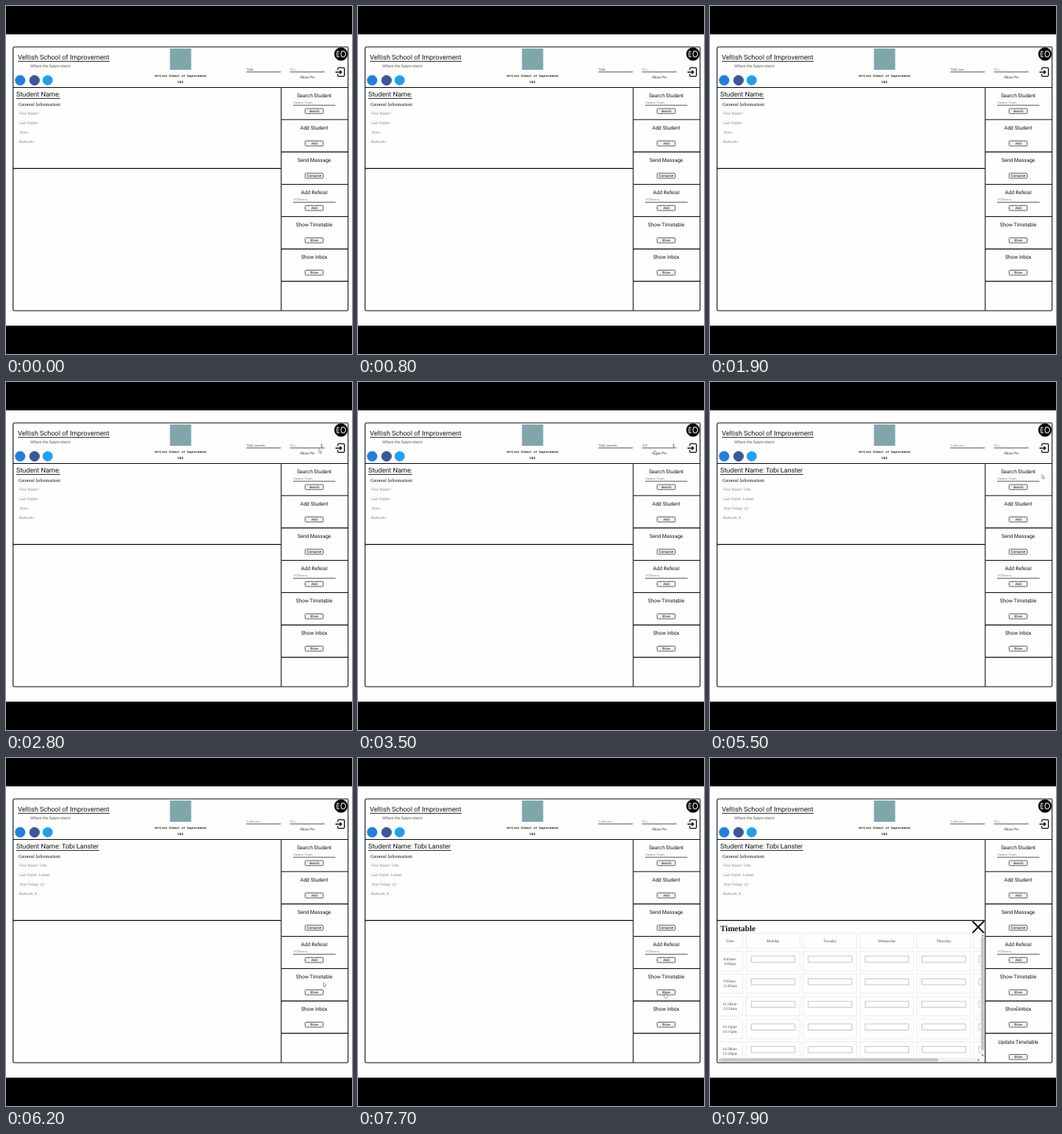
Recreate the animation shown at these times as an HTML page. Size 440x442 px, loop 8000 ms.

```html
<!DOCTYPE html>
<html lang="en">
<head>
<meta charset="utf-8">
<title>School portal</title>
<style>
html, body { margin: 0; width: 100%; height: 100%; overflow: hidden; background: #000; }
svg { display: block; width: 440px; height: 442px; }
text { font-family: Roboto, sans-serif; fill: #151515; text-rendering: geometricPrecision; white-space: pre; }
.serif { font-family: "Liberation Serif", serif; }
.mono { font-family: "Liberation Mono", monospace; font-weight: bold; }
.mid { text-anchor: middle; }
.hint { font: italic 4.4px "Liberation Serif", serif; fill: #858585; }
.typed { font: 4.6px "Liberation Serif", serif; fill: #444; }
.info { font: 5.1px "Liberation Serif", serif; fill: #777; }
.cellText { font: 5px "Liberation Serif", serif; fill: #444; text-anchor: middle; }
.line { fill: none; stroke: #151515; }
.thin { fill: none; stroke: #333; stroke-width: .8; }
.button { fill: #f1f1f1; stroke: #444; stroke-width: .8; }
.cell { fill: none; stroke: #e9e9e9; stroke-width: .8; }
.input { fill: #fff; stroke: #bbb; stroke-width: .8; }
</style>
</head>
<body>
<svg viewBox="0 0 440 442" xmlns="http://www.w3.org/2000/svg">
  <defs>
    <clipPath id="tableClip"><rect x="10" y="207" width="334" height="173.5"/></clipPath>
  </defs>
  <rect width="440" height="442"/>
  <rect y="36" width="440" height="370" fill="#fefefe"/>

  <!-- Header -->
  <text x="15" y="67.5" font-size="8.55">Veltish School of Improvement</text>
  <path class="line" stroke-width=".9" d="M15 70.3H132"/>
  <text x="31" y="78" font-size="5.15" font-style="italic" style="fill:#555">Where the future starts</text>
  <circle cx="18" cy="94.3" r="6.6" fill="#1f7fe0"/>
  <circle cx="36.3" cy="94.3" r="6.6" fill="#3b5998"/>
  <circle cx="53" cy="94.3" r="6.4" fill="#1da1f2"/>
  <rect x="208.5" y="54" width="27" height="27" fill="#7fa6aa"/>
  <text class="mono mid" x="222" y="90.3" font-size="3.8">Veltish School of Improvement</text>
  <text class="mono mid" x="222" y="98" font-size="4.2">VSI</text>

  <!-- Login fields -->
  <path class="thin" d="M305.5 83.8H349.5M361 83.8H405"/>
  <text class="typed" id="name" x="306" y="82"></text>
  <text class="hint" x="306" y="82" data-on="5300 8000">Fullname...</text>
  <text class="hint" x="361.5" y="82" data-on="0 2900 5300 8000">Pin...</text>
  <text class="typed" id="pin" x="361.5" y="82"></text>
  <path data-on="2800 3700" d="M400 80.2l1.4-1.8 1.4 1.8zM400 81.4l1.4 1.8 1.4-1.8z" fill="#555"/>
  <rect data-on="3600 5000" x="373.7" y="87" width="12" height="6.2" fill="#2d86e2"/>
  <text x="374" y="91.8" font-size="4.5" style="fill:#333">Show Pin</text>
  <text data-on="3600 5000" x="374" y="91.8" font-size="4.5" style="fill:#fff">Show<tspan fill="#2d86e2"> Pin</tspan></text>

  <!-- Theme and sign-in icons -->
  <circle cx="426" cy="61" r="8.6"/>
  <g fill="none" stroke="#fff" stroke-width="1">
    <path d="M427 57.2h1.2a3.8 3.8 0 0 1 0 7.6H427q-2.2-3.8 0-7.6z"/>
    <path d="M420.3 57.8h3.6M419.6 60h3.4M419.6 62.2h3.4M420.3 64.4h3.6"/>
  </g>
  <path class="line" stroke-width="1.3" d="M421.8 81.5V80q0-1.6 1.6-1.6h5.4q1.6 0 1.6 1.6v7.8q0 1.6-1.6 1.6h-5.4q-1.6 0-1.6-1.6v-1.5M419 84h7.5M424.4 81.6l2.4 2.4-2.4 2.4"/>

  <!-- Student details -->
  <text x="13" y="115" font-size="8.5">Student Name:<tspan data-on="5300 8000"> Tobi Lanster</tspan></text>
  <path class="line" stroke-width=".9" d="M13 117.4H69"/>
  <path class="line" stroke-width=".9" data-on="5300 8000" d="M69 117.4H118.5"/>
  <text class="serif" x="16" y="127" font-size="6.4">General Information:</text>
  <g id="blank" data-on="0 5300"></g>
  <g id="filled" data-on="5300 8000"></g>

  <g id="panels"></g>

  <!-- Timetable -->
  <g data-on="7800 8000">
    <text class="serif" x="13" y="219.6" font-size="10.4" font-weight="bold">Timetable</text>
    <g id="table" clip-path="url(#tableClip)"></g>
    <rect x="344" y="223" width="5.5" height="158" fill="#f1f1f1"/>
    <rect x="344.8" y="228" width="3.8" height="143" fill="#c4c4c4"/>
    <path d="M345.2 226.5l1.5-2 1.5 2zM345.2 376.8l1.5 2 1.5-2z" fill="#666"/>
    <rect x="10" y="380.6" width="334" height="5.6" fill="#f1f1f1"/>
    <rect x="15" y="381.5" width="275" height="3.8" fill="#c4c4c4"/>
    <path d="M13.5 382l-2 1.4 2 1.4zM340.5 382l2 1.4-2 1.4z" fill="#666"/>
    <path class="line" stroke-width="2" d="M333.8 207.3l14.6 14.8M348.4 207.3l-14.6 14.8"/>
  </g>

  <rect class="line" x="9" y="52" width="426" height="335" rx="1.5" stroke-width="1.1"/>
  <path class="line" stroke-width="1.1" d="M9 103.5H435M350 103.5V387M9 206.4H350M350 144.3H435M350 185.4H435M350 226.5H435M350 267.5H435M350 308.6H435M350 349.6H435"/>

  <g id="cursor" stroke="#666" stroke-width=".55" fill="#fff">
    <path id="arrow" d="M0 0v5.2l1.2-1 .8 1.8.9-.4-.8-1.7h1.6z"/>
    <path id="hand" d="M-.7 0h1.3v2.3l2.3.6v2l-.8 1.6h-2.8l-1.8-2.6.6-.6 1.2.7z"/>
  </g>
</svg>
<script>
const $ = id => document.getElementById(id);
const rect = (cls, x, y, w, h, rx = 0) =>
  `<rect class="${cls}" x="${x}" y="${y}" width="${w}" height="${h}" rx="${rx}"/>`;
const text = (cls, x, y, s, size) =>
  `<text class="${cls}" x="${x}" y="${y}"${size ? ` font-size="${size}"` : ''}>${s}</text>`;

const infoLines = lines => lines.map((s, i) => text('info', 17, 138.4 + i * 11.7, s)).join('');
$('blank').innerHTML = infoLines(['First Name:-', 'Last Name:-', 'Year:-', 'Referals:-']);
$('filled').innerHTML = infoLines(['First Name: Tobi', 'Last Name: Lanser', 'Year Group: 12', 'Referals: 0']);

const panels = [
  ['Search Student', 'Search', 'Student Name...'],
  ['Add Student', 'Add'],
  ['Send Message', 'Compose'],
  ['Add Referal', 'Add', 'Fullname...'],
  ['Show Timetable', 'Show'],
  ['Show Inbox', 'Show'],
  ['Update Timetable', 'Show']
];
$('panels').innerHTML = panels.map(([title, label, hint], i) => {
  const y = 103.3 + i * 41.05;
  const field = hint
    ? text('hint', 365.5, y + 20.6, hint) + `<path class="thin" d="M365 ${y + 22.8}H419"/>` : '';
  return `<g${i === 6 ? ' data-on="7800 8000"' : ''}>` + text('mid', 392, y + 12.9, title, 6.5) + field +
    rect('button', 380.4, y + 26.9, 23, 6.5, 1.2) + text('mid', 392, y + 31.7, label, 4.3) + '</g>';
}).join('');

const days = ['Monday', 'Tuesday', 'Wednesday', 'Thursday', ''];
const hours = [['8:45am-', '9:00am'], ['9:05am-', '11:05am'], ['11:20am-', '13:10am'],
  ['13:15pm-', '14:15pm'], ['14:20pm-', '15:20pm']];
const dayX = i => 46 + i * 72.3;
$('table').innerHTML = rect('cell', 10.5, 222.5, 31, 19) + text('cellText', 25.5, 233.8, 'Time') +
  days.map((d, i) => rect('cell', dayX(i), 222.5, 68.3, 19) +
    text('cellText', dayX(i) + 34.3, 233.8, d)).join('') +
  hours.map(([from, to], r) => {
    const y = 245.8 + r * 28.7;
    return rect('cell', 10.5, y, 31, 24.3) + text('cellText', 25.5, y + 10.7, from) +
      text('cellText', 25.5, y + 16.7, to) +
      days.map((_, i) => rect('cell', dayX(i), y, 68.3, 24.3) +
        rect('input', dayX(i) + 6.6, y + 5.9, 55.5, 7.6)).join('');
  }).join('');

const LOOP = 8000;
const nameKeys = [1400, 1500, 1700, 1900, 2100, 2200, 2400, 2500];
const pinKeys = [2900, 3000, 3200, 3600];
const path = [[2500, 442, 98], [2800, 398, 85], [3100, 381, 82], [3500, 377, 87], [3800, 377, 88.5],
  [4400, 423, 84], [5300, 424, 84], [5700, 420, 150], [6200, 403.5, 285], [6600, 394, 296],
  [6900, 391.5, 298], [7700, 391, 298.5], [7900, 390, 315], [8000, 390, 315]];

const timed = [...document.querySelectorAll('[data-on]')].map(el => [el, el.dataset.on.split(' ').map(Number)]);
const within = (t, spans) => spans.some((s, i) => i % 2 === 0 && t >= s && t < spans[i + 1]);
const show = (el, on) => { el.style.display = on ? '' : 'none'; };
const pressed = (keys, t) => keys.filter(k => k <= t).length;

function moveCursor(t) {
  show($('cursor'), t >= path[0][0]);
  const i = path.findIndex(p => p[0] > t);
  if (i < 1) return;
  const [t0, x0, y0] = path[i - 1], [t1, x1, y1] = path[i];
  const k = (t - t0) / (t1 - t0), e = k * k * (3 - 2 * k);
  $('cursor').setAttribute('transform', `translate(${x0 + (x1 - x0) * e} ${y0 + (y1 - y0) * e})`);
  const hand = within(t, [4300, 5400, 6600, 7800]);
  show($('hand'), hand);
  show($('arrow'), !hand);
}

function draw() {
  const t = performance.now() % LOOP;
  for (const [el, spans] of timed) show(el, within(t, spans));
  const loggedIn = t >= 5300;
  $('name').textContent = loggedIn ? '' : 'Tobi Lanster'.slice(0, 4 + pressed(nameKeys, t));
  $('pin').textContent = loggedIn ? '' : '1'.repeat(pressed(pinKeys, t));
  moveCursor(t);
  requestAnimationFrame(draw);
}
draw();
</script>
</body>
</html>
```
